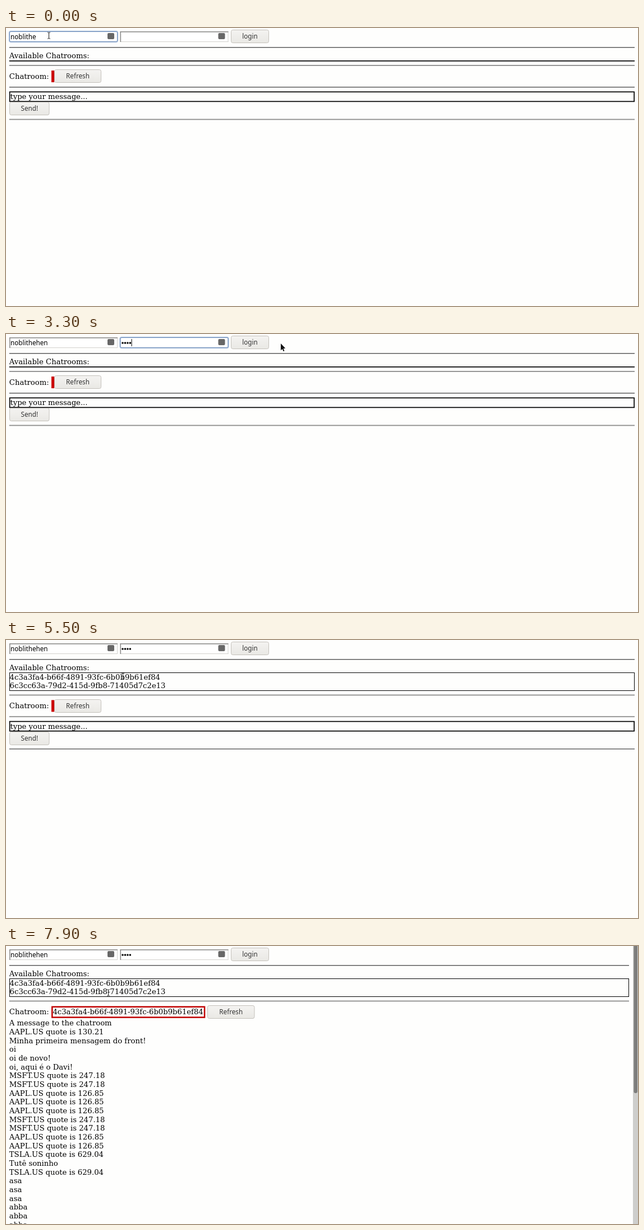
Animation of 1127x497 px, one loop 8 s. Source, as an HTML page with a canvas:

```html
<!DOCTYPE html>
<html lang="en">
<head>
<meta charset="utf-8">
<title>Chatroom login</title>
<style>
  html, body { margin: 0; width: 100%; height: 100%; overflow: hidden; background: #fefefd; }
  canvas { display: block; }
</style>
</head>
<body>
<canvas id="stage" width="1127" height="497"></canvas>
<script>
const ctx = document.getElementById('stage').getContext('2d');
const LOOP = 8000, LEFT = 5.8, LINE = 15.675;
const SERIF = '13.2px "DejaVu Serif", serif';
const SANS = '11.7px "Noto Sans", "Open Sans", sans-serif';
const USER = 'noblithehen';
const ROOMS = ['4c3a3fa4-b66f-4891-93fc-6b0b9b61ef84', '6c3cc63a-79d2-415d-9fb8-71405d7c2e13'];

const quote = (symbol, price, count = 1) => Array(count).fill(`${symbol}.US quote is ${price}`);
const MESSAGES = [
  'A message to the chatroom', ...quote('AAPL', '130.21'),
  'Minha primeira mensagem do front!', 'oi', 'oi de novo!', 'oi, aqui é o Davi!',
  ...quote('MSFT', '247.18', 2), ...quote('AAPL', '126.85', 3),
  ...quote('MSFT', '247.18', 2), ...quote('AAPL', '126.85', 2),
  ...quote('TSLA', '629.04'), 'Tutê soninho', ...quote('TSLA', '629.04'),
  'asa', 'asa', 'asa', 'abba', 'abba', 'abba'
];

// Each pointer entry: time, x, y, and whether it is an arrow.
const POINTER = [
  [0, 76.5, 13.5], [3000, 79, 13.5],
  [3200, 330, 17], [3300, 490, 17, true], [3400, 494, 18, true], [3500, 492, 18, true],
  [3600, 486, 15, true], [3700, 476, 12, true], [3800, 465, 10, true],
  [3900, 458, 9, true], [4000, 454.5, 9, true],
  [4700, 405, 19, true], [4800, 305, 34, true], [4900, 260.5, 40, true],
  [5100, 240, 48, true], [5200, 220, 61], [5300, 208.5, 65],
  [6200, 212, 80], [6300, 222, 99], [6400, 229, 112], [6600, 227.5, 113.5], [6800, 256, 124],
  [7200, 248, 120], [7300, 233, 112], [7400, 216, 102], [7500, 201, 94],
  [7600, 188, 88], [7700, 183, 86], [7900, 182.5, 83.5]
];
const TYPED = [[0, 8], [100, 9], [200, 10], [1000, 11]];
const DOTS = [[0, 0], [2300, 2], [2500, 3], [2800, 4]];

const latest = (steps, t) => steps.filter(step => step[0] <= t).pop();
const within = (t, from, to) => t >= from && t < to;

function fill(x, y, w, h, color) {
  ctx.fillStyle = color;
  ctx.fillRect(x, y, w, h);
}

function text(str, x, y, font = SERIF, color = '#000') {
  ctx.font = font;
  ctx.fillStyle = color;
  ctx.fillText(str, x, y);
}

function rounded(x, y, w, h, r, fillStyle, strokeStyle, lineWidth = 1) {
  ctx.beginPath();
  ctx.roundRect(x, y, w, h, r);
  if (fillStyle) { ctx.fillStyle = fillStyle; ctx.fill(); }
  if (strokeStyle) {
    ctx.strokeStyle = strokeStyle;
    ctx.lineWidth = lineWidth;
    ctx.stroke();
  }
}

function frame(x, y, w, h, width, color) {
  ctx.strokeStyle = color;
  ctx.lineWidth = width;
  ctx.strokeRect(x + width / 2, y + width / 2, w - width, h - width);
}

function rule(y, right) {
  fill(LEFT, y, right - LEFT, 1, '#555');
  fill(LEFT, y + 1, right - LEFT, 0.7, '#999');
}

function button(label, x, y, w, { hover, focus, pressed } = {}) {
  const shade = ctx.createLinearGradient(0, y, 0, y + 24);
  const [top, bottom] = pressed ? ['#d8d6d1', '#dedcd8'] : hover ? ['#fafaf9', '#f2f1ee'] : ['#f4f3f1', '#e9e8e4'];
  shade.addColorStop(0, top);
  shade.addColorStop(1, bottom);
  rounded(x + 0.5, y + 0.5, w - 1, 23, 3, shade, '#c4c1bb');
  if (focus) rounded(x + 3, y + 3, w - 6, 18, 2, null, '#c3c0ba');
  ctx.textAlign = 'center';
  text(label, x + w / 2, y + 16.4, SANS, '#333');
  ctx.textAlign = 'left';
}

function field(x, focused, iconColor) {
  if (focused) {
    rounded(x - 0.2, 5.8, 193.4, 19.2, 3, '#fff', '#b3c6e0', 2);
    rounded(x + 0.5, 6.5, 192, 17.8, 2, null, '#6586b5');
  } else {
    fill(x, 6, 193, 19, '#fff');
    fill(x, 24, 193, 1, '#d2d1ce');
    fill(x + 192, 6, 1, 19, '#d2d1ce');
    fill(x, 6, 193, 1.6, '#8e8d8b');
    fill(x, 6, 1.6, 19, '#8e8d8b');
  }
  rounded(x + 175, 9, 12, 11, 2, iconColor);
}

function caret(x) {
  fill(x, 9, 1, 13, '#000');
}

function drawLogin(t) {
  const onUser = t < 1500, onPassword = within(t, 1500, 4100);
  const userIcon = within(t, 100, 1500) ? '#000' : within(t, 1500, 3200) ? '#8a8a8a' : '#676767';
  field(6, onUser, userIcon);
  field(203.5, onPassword, within(t, 1500, 3200) ? '#000' : '#676767');

  const name = USER.slice(0, latest(TYPED, t)[1]);
  text(name, 8, 19.6, SANS);
  if (within(t, 100, 1200)) caret(8 + ctx.measureText(name).width);

  const dots = latest(DOTS, t)[1];
  ctx.fillStyle = '#000';
  for (let i = 0; i < dots; i++) {
    ctx.beginPath();
    ctx.arc(208 + 4.45 * i, 16, 1.8, 0, 7);
    ctx.fill();
  }
  if (onPassword) caret(206 + 4.4 * dots);

  button('login', 401, 3, 68, {
    hover: within(t, 3800, 4700),
    focus: within(t, 4100, 5500),
    pressed: within(t, 4100, 4200)
  });
}

function drawPage(t) {
  const listed = t >= 4500, opened = t >= 5600;
  const right = opened ? 1111 : 1121, width = right - LEFT;
  const shift = listed ? 31.4 : 0;

  rule(34, right);
  text('Available Chatrooms:', LEFT, 54.3);
  if (listed) {
    frame(6, 58, right - 6, 33, 1, '#000');
    ROOMS.forEach((room, i) => text(room, 6.6, 70.8 + i * LINE));
  } else {
    fill(LEFT, 58, width, 1.7, '#000');
  }
  rule(66.3 + shift, right);

  text('Chatroom:', LEFT, 91 + shift);
  if (opened) {
    frame(81, 107.5, 274.3, 21.3, 2.5, '#c00000');
    text(ROOMS[0], 83.4, 122.4);
    button('Refresh', 359, 106, 84.5);
    MESSAGES.forEach((message, i) => text(message, LEFT, 142.2 + i * LINE));
    fill(1118, 0, 9, 497, '#cececc');
    rounded(1119.5, -5, 6.5, 268, 3, '#7d7d7c');
    return;
  }
  fill(81, 76 + shift, 5, 21, '#cc0000');
  button('Refresh', 86, Math.round(74.3 + shift), 84);
  rule(105 + shift, right);
  frame(LEFT, 113.4 + shift, width, 18.8, 1.7, '#000');
  text('type your message...', 7.4, 127.2 + shift);
  button('Send!', 6, Math.round(132.4 + shift), 71.5);
  rule(162.7 + shift, right);
}

function drawPointer(t) {
  const [, x, y, arrow] = latest(POINTER, t);
  ctx.save();
  ctx.translate(x, y);
  if (arrow) {
    ctx.beginPath();
    ctx.moveTo(0, 0);
    [[0, 12.2], [2.7, 9.7], [4.6, 14], [6.5, 13.2], [4.6, 9], [8.2, 8.6]].forEach(p => ctx.lineTo(...p));
    ctx.closePath();
    ctx.lineWidth = 1.4;
    ctx.strokeStyle = '#fff';
    ctx.stroke();
    ctx.fillStyle = '#111';
    ctx.fill();
  } else {
    fill(-0.5, -5.5, 1, 11, '#111');
    for (const end of [-6, 5]) {
      fill(-2.5, end, 2, 1, '#333');
      fill(0.5, end, 2, 1, '#333');
    }
  }
  ctx.restore();
}

function render() {
  const t = performance.now() % LOOP;
  fill(0, 0, 1127, 497, '#fefefd');
  drawLogin(t);
  drawPage(t);
  drawPointer(t);
  requestAnimationFrame(render);
}
render();
</script>
</body>
</html>
```
